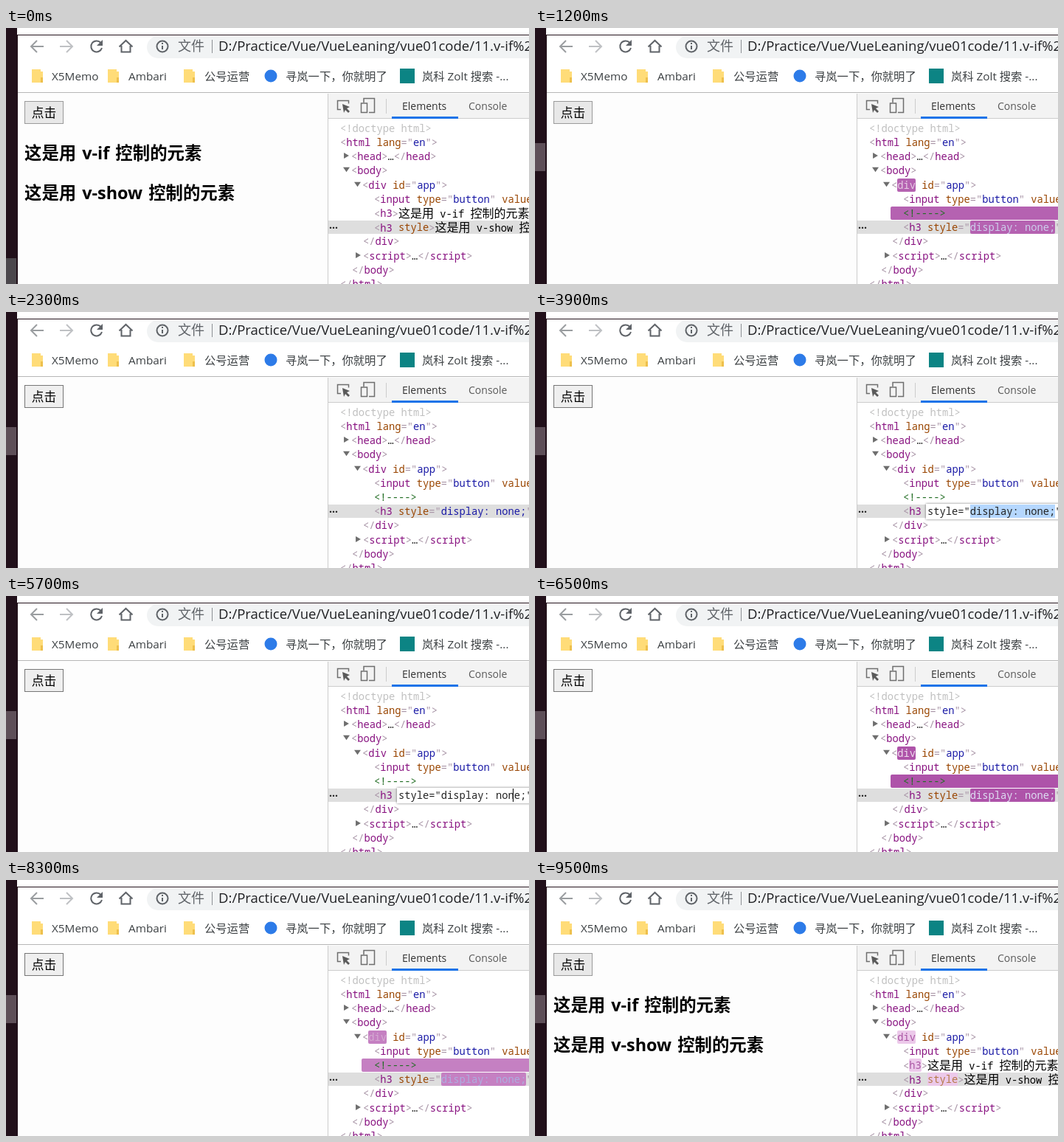
An HTML page that plays this animation: 709x347 px, repeating every 9.6 s.

```html
<!DOCTYPE html>
<html lang="zh-CN">
<head>
<meta charset="utf-8">
<title>v-if / v-show</title>
<style>
html, body { margin: 0; width: 100%; height: 100%; overflow: hidden; background: #fff; }
#stage {
  position: absolute; left: 0; top: 0; width: 709px; height: 347px; overflow: hidden;
  background: #fff; color: #3c4043; white-space: pre;
  font: 15.3px/20px "Open Sans", "Noto Sans CJK SC", "Noto Sans CJK", sans-serif;
}
:where(#stage div, #stage svg) { position: absolute; left: 0; top: 0; }
#strip { left: 0; top: 0; width: 15px; height: 347px; background: #21101a; }
#strip div { left: 0; width: 14px; top: 312px; height: 35px; background: #4b474c; }
.scrolled #strip div { top: 156px; height: 38px; background: #5e4f58; }
#frame { left: 15px; top: 9px; width: 694px; height: 338px; border: solid #24131c; border-width: 1px 0 0 1px; box-sizing: border-box; }
#pill { left: 191px; top: 11px; width: 540px; height: 30px; border-radius: 15px; background: #f1f3f4; }
.address { top: 12px; line-height: 24px; font-size: 18.5px; color: #202124; }
.mark { top: 55px; }

#page { left: 16px; top: 89px; width: 420px; height: 258px; background: #fdfdfd; color: #000; }
#button {
  left: 9px; top: 10px; width: 53px; height: 31px; box-sizing: border-box;
  border: 1px solid #9a9a9a; background: #e8e8e8;
  text-align: center; line-height: 29px; font-size: 16.7px;
}
.rest #button { border-color: #767676; background: #efefef; }
.press #button { border-color: #8d8d8d; background: #f5f5f5; }
.title { left: 9px; font-size: 23.4px; font-weight: bold; line-height: 32px; word-spacing: 2px; }
.gone .title { visibility: hidden; }
#overlay { visibility: hidden; }
.inspect #overlay { visibility: visible; }
#overlay .box { width: 404px; height: 33px; border: 8px solid rgba(246,178,107,.66); background: rgba(111,168,220,.66); background-clip: padding-box; }
#overlay .tip { left: 4px; top: 54px; width: 148px; height: 52px; border-radius: 4px; background: #fff; box-shadow: 0 1px 5px #0006; }
#overlay .tip div { left: 9px; top: 16px; font-size: 14px; color: #555; }
#overlay b { color: #881280; }

#tools { left: 436px; top: 89px; width: 273px; height: 258px; border-left: 1px solid #ccc; box-sizing: border-box; background: #fff; }
#bar { left: 437px; top: 89px; width: 272px; height: 33px; background: #f3f3f3; border-bottom: 1px solid #ccc; }
.tab { top: 96px; font-size: 14px; color: #5a5a5a; }
#underline { left: 523px; top: 120px; width: 90px; height: 3px; background: #1a73e8; }
.row { left: 437px; width: 272px; height: 18px; line-height: 18px; color: #a894a6; font-family: "Noto Sans Mono", "Noto Sans CJK SC", "Noto Sans CJK", monospace; font-size: 13.75px; }
.row .code { height: 18px; width: 400px; }
.row span { line-height: 18px; }
.row .han { font-size: 16px; color: #000; }
.han i { font-style: normal; font-size: 13.75px; }
.row.picked { background: #dedede; }
.row .hover { left: 4px; width: 280px; height: 18px; border-radius: 4px; background: #e8eef9; visibility: hidden; }
.row.over .hover { visibility: visible; }
.tag { color: #881280; }
.attr { color: #994500; }
.value { color: #1a1aa6; }
.note { color: #236e25; }
.dim { color: #c0c0c0; }
.ink { color: #222; }
.arrow { width: 9px; height: 8px; background: #6e6e6e; }
.down { clip-path: polygon(0 10%, 100% 10%, 50% 90%); }
.right { clip-path: polygon(12% 0, 88% 50%, 12% 100%); }
#comment { left: 45px; width: 230px; height: 18px; }
.flash { border-radius: 2px; animation: flash 1.4s linear both paused; animation-delay: calc(var(--age) * -1ms); }
span.flash { display: inline-block; height: 18px; vertical-align: top; }
@keyframes flash {
  from { background-color: #9e3699; color: #fff; }
  80% { background-color: #f5dbf4; }
}
.gone .shown, #stage:not(.gone) .absent { display: none; }

#editor { left: 530px; top: 260px; width: 200px; height: 21px; line-height: 20px; background: #fff; box-shadow: 0 0 3px #0008; color: #222; text-indent: 2px; visibility: hidden; }
.edit #editor { visibility: visible; }
.select #editor span { background: #b5d7fe; }
#editor span { display: inline-block; line-height: 18px; text-indent: 0; }
#caret { left: 157px; top: 1px; width: 1px; height: 18px; background: #000; visibility: hidden; }
.caret #caret { visibility: visible; }
</style>
</head>
<body>
<div id="stage">
  <div id="strip"><div></div></div>
  <div id="frame"></div>
  <div id="pill"></div>
  <svg width="709" height="88" fill="none" stroke="#5f6368" stroke-width="2">
    <path d="M51 25H34M42 17l-8 8 8 8" stroke="#9a9da0"/>
    <path d="M73 25h17M82 17l8 8-8 8" stroke="#bfc1c4"/>
    <path d="M128.500 20A7.500 7.500 0 1 0 130 27"/>
    <path d="M131 16v8h-8z" fill="#5f6368" stroke="none"/>
    <path d="M153.500 25.500l9-8.500 9 8.500M156.500 24v8.500h12V24"/>
    <circle cx="212" cy="25" r="7.500"/>
    <path d="M212 24v5M212 20v2"/>
    <path d="M279.500 16v18" stroke="#8d9094" stroke-width="1"/>
    <g id="folders" stroke="none"></g>
    <circle cx="359" cy="65" r="8.500" fill="#2d7be8" stroke="none"/>
    <rect x="534" y="55" width="20" height="20" fill="#0c8484" stroke="none"/>
    <path d="M16 87.500H709" stroke="#b6b6b6" stroke-width="1"/>
  </svg>
  <div class="address" style="left:233px;color:#5f6368;font-size:18px">文件</div>
  <div class="address" style="left:288px">D:/Practice/Vue/VueLeaning/vue01code/11.v-if%20</div>
  <div class="mark" style="left:62px">X5Memo</div>
  <div class="mark" style="left:166px">Ambari</div>
  <div class="mark" style="left:269px">公号运营</div>
  <div class="mark" style="left:379px">寻岚一下，你就明了</div>
  <div class="mark" style="left:564px">岚科 Zolt 搜索 -...</div>

  <div id="page">
    <div id="button">点击</div>
    <div class="title" style="top:64px">这是用 v-if 控制的元素</div>
    <div class="title" style="top:118px">这是用 v-show 控制的元素</div>
    <div id="overlay">
      <div class="box"></div>
      <div class="tip"><div><b>body</b>  404 × 33</div></div>
    </div>
  </div>

  <div id="tools"></div>
  <div id="bar"></div>
  <svg width="709" height="130" fill="none" stroke="#6e6e6e" stroke-width="1.500">
    <path d="M454 110.500h-4.500v-12h15v4"/>
    <path d="M456 103l10 4-4 2 4 4-2 2-4-4-2 4z" fill="#5a5a5a" stroke="none"/>
    <path d="M485 101v-5.500h14.500v19H492"/>
    <rect x="481.500" y="102" width="8" height="12.500"/>
    <path d="M515.500 96v20" stroke="#ccc" stroke-width="1"/>
  </svg>
  <div class="tab" style="left:537px;color:#333">Elements</div>
  <div class="tab" style="left:627px">Console</div>
  <div id="underline"></div>
  <div id="tree"></div>
  <div id="editor" class="row">style="<span>display: none;</span>"<div id="caret"></div></div>
</div>
<script>
const stage = document.getElementById('stage');
const LOOP = 9600;

const span = (kind, text) => `<span class="${kind}">${text}</span>`;
const tag = (name, kind = 'tag') => span(kind, name);
const attr = (name, value) => ` ${span('attr', name)}="${span('value', value)}"`;
const open = (name, rest = '') => `&lt;${tag(name)}${rest}&gt;`;
const close = name => `&lt;/${tag(name)}&gt;`;
const folded = name => open(name) + span('ink', '…') + close(name);
const han = word => span('han', `这是用<i> ${word} </i>控制的元素`);

const rows = [
  [453, span('dim', '&lt;!doctype html&gt;')],
  [453, open('html', attr('lang', 'en'))],
  [468, folded('head'), 'right'],
  [468, open('body'), 'down'],
  [483, `&lt;${tag('div', 'tag flash')}${attr('id', 'app')}&gt;`, 'down'],
  [499, open('input', attr('type', 'button') + attr('value', '点击'))],
  [499, span('shown', `&lt;${tag('h3', 'tag flash')}&gt;${han('v-if')}`)
    + span('absent note', '&lt;!----&gt;')],
  [499, `&lt;${tag('h3')} `
    + span('shown', `${span('attr flash', 'style')}&gt;${han('v-show')}`)
    + span('absent', `${span('attr', 'style')}="${span('value flash', 'display: none;')}"&gt;`)],
  [484, close('div')],
  [484, folded('script'), 'right'],
  [469, close('body')],
  [453, close('html')]
];

document.getElementById('tree').innerHTML = rows.map(([x, code, arrow], i) => {
  const left = x - 437;
  const comment = i === 6 ? '<div id="comment" class="flash absent"></div>' : '';
  const dots = i === 7 ? '<div class="ink" style="left:1px;top:-3px;font:bold 14px/18px Open Sans,sans-serif">...</div>' : '';
  const mark = arrow ? `<div class="arrow ${arrow}" style="left:${left - 11}px;top:4px"></div>` : '';
  return `<div class="row ${i === 7 ? 'picked' : ''}" style="top:${Math.round(126.8 + 19.2 * i)}px">`
    + `<div class="hover"></div>${comment}${dots}${mark}<div class="code" style="left:${left}px">${code}</div></div>`;
}).join('');

document.getElementById('folders').innerHTML = [35, 138, 241].map(x =>
  `<path d="M${x} 56h12v3h3v15h-15z" fill="#ffdc78"/><path d="M${x + 12} 67h3v7h-3z" fill="#eec04c"/>`).join('');

const toggles = [900, 5900, 6300, 7500, 7800, 8500];
const hovers = [[100, 200, 2], [1700, 2000, 9], [4700, 4900, 10]];
const treeRows = document.querySelectorAll('#tree .row');
const states = {
  scrolled: [[1000, LOOP]],
  press: [[700, 900], [5800, 5900], [6200, 6300], [7400, 7500], [7700, 7800], [8400, 8500]],
  rest: [[1600, 8700]],
  edit: [[3900, 5800]],
  select: [[3900, 4500]],
  caret: [[4500, 4900], [5400, 5800]],
  inspect: [[4700, 4900]]
};

function render(now) {
  const t = Math.floor(now % LOOP / 100) * 100;
  const within = ([from, to]) => t >= from && t < to;
  const past = toggles.filter(at => at <= t);
  stage.classList.toggle('gone', past.length % 2 === 1);
  stage.style.setProperty('--age', past.length ? t - past[past.length - 1] : 1400);
  for (const name in states) stage.classList.toggle(name, states[name].some(within));
  const hover = hovers.find(within);
  treeRows.forEach((row, i) => row.classList.toggle('over', !!hover && hover[2] === i));
}

const start = performance.now();
function tick() {
  render(performance.now() - start);
  requestAnimationFrame(tick);
}
tick();
</script>
</body>
</html>
```
